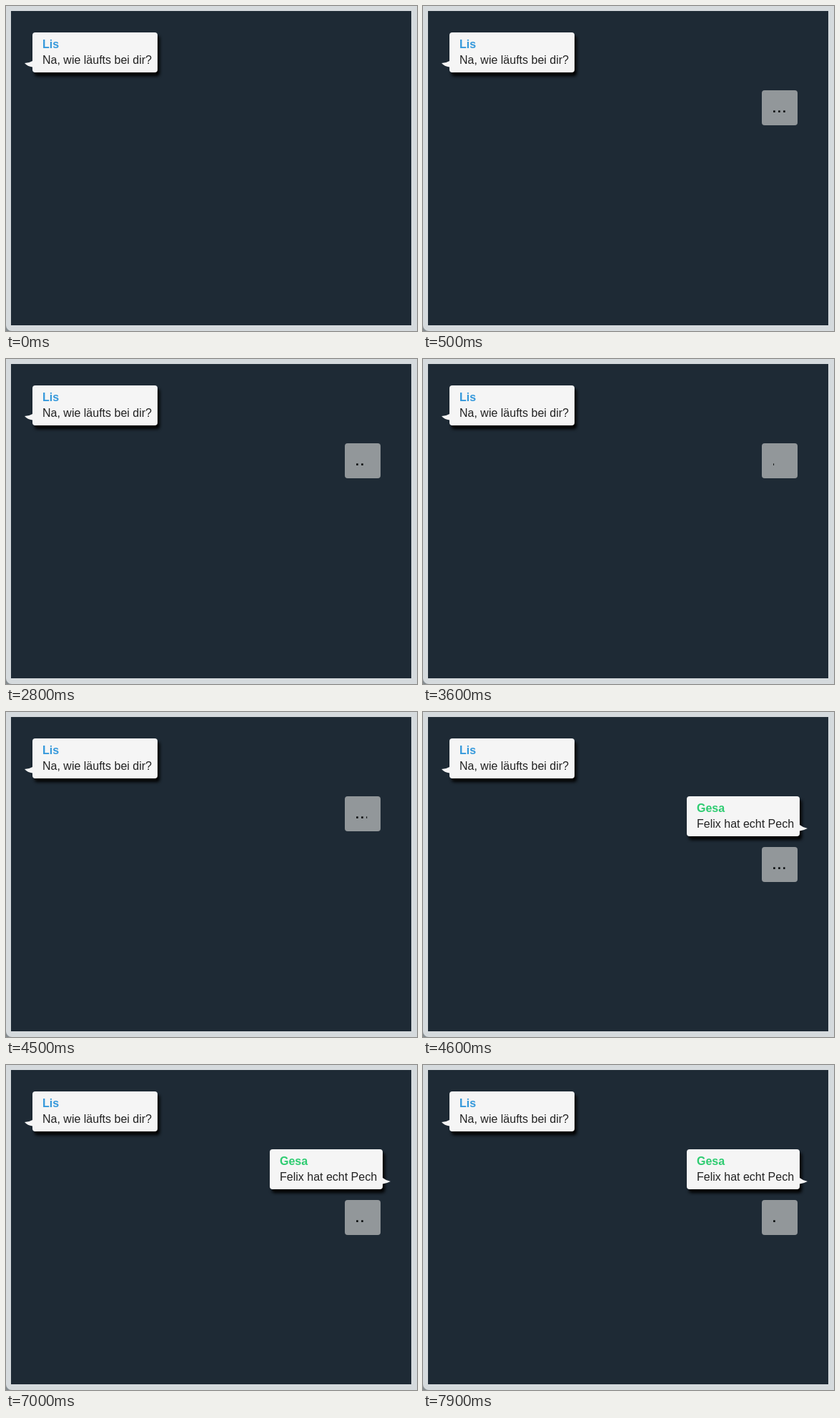
An HTML page that plays this animation: 575x455 px, repeating every 8000 ms.

```html
<!DOCTYPE html>
<html lang="de">
<head>
<meta charset="utf-8">
<title>Chat</title>
<style>
  html, body { margin: 0; width: 100%; height: 100%; overflow: hidden; background: #858c90; }
  #stage { position: relative; width: 575px; height: 455px; overflow: hidden; box-sizing: border-box;
    background: #d5dadd; border-bottom-left-radius: 8px; font: 16px/22px "Liberation Sans", Arial, sans-serif; }
  #screen { position: absolute; left: 7px; top: 7px; width: 560px; height: 440px; background: #1e2a35; }
  .bubble { position: absolute; height: 56px; box-sizing: border-box; padding: 6px 0 0 14px;
    border-radius: 4px; background: #f5f5f5; color: #222; white-space: nowrap; box-shadow: 3px 5px 4px #000; }
  .bubble b { display: block; }
  .bubble svg { position: absolute; top: 39px; width: 11px; height: 11px; fill: #f5f5f5; }
  #question { left: 37px; top: 37px; width: 175px; }
  #question b { color: #3498db; }
  #question svg { left: -11px; }
  #answer { left: 369px; top: 118px; width: 158px; }
  #answer b { color: #2ecc71; }
  #answer svg { right: -11px; }
  #typing { position: absolute; left: 474px; width: 50px; height: 49px; border-radius: 4px; background: #92979a; }
  #typing svg { position: absolute; left: 0; top: 0; }
</style>
</head>
<body>
<div id="stage">
  <div id="screen"></div>
  <div class="bubble" id="question"><b>Lis</b>Na, wie läufts bei dir?
    <svg><path d="M0 4Q6 4 11 1V9.5Q4 8.5 0 4"/></svg></div>
  <div class="bubble" id="answer"><b>Gesa</b>Felix hat echt Pech
    <svg><path d="M11 6Q5 5 0 1V9.5Q6 8.5 11 6"/></svg></div>
  <div id="typing"><svg width="50" height="49">
    <clipPath id="reveal"><rect id="window" x="13" width="0" height="49"/></clipPath>
    <g clip-path="url(#reveal)" fill="#060809">
      <rect x="16.1" y="28.3" width="2.6" height="2.6"/>
      <rect x="23.1" y="28.3" width="2.6" height="2.6"/>
      <rect x="30.1" y="28.3" width="2.6" height="2.6"/>
    </g>
  </svg></div>
</div>
<script>
  const LOOP = 8000, TICK = 100;
  const TYPING_START = 500, ANSWER_START = 4600;
  const DOTS_PERIOD = 1375, DOTS_RESET = 590, DOTS_WIDTH = 21.5;
  const byId = id => document.getElementById(id);
  const answer = byId("answer"), typing = byId("typing"), revealWindow = byId("window");
  const show = (element, visible) => element.style.display = visible ? "block" : "none";

  function draw(time) {
    const t = Math.floor(time % LOOP / TICK) * TICK;
    const answered = t >= ANSWER_START;
    show(answer, answered);
    show(typing, t >= TYPING_START);
    typing.style.top = (answered ? 189 : 118) + "px";
    // The dots are uncovered from left to right, then hidden at once.
    const phase = (t - DOTS_RESET + DOTS_PERIOD) % DOTS_PERIOD / DOTS_PERIOD;
    revealWindow.setAttribute("width", phase * DOTS_WIDTH);
  }

  const start = performance.now();
  function frame() {
    draw(performance.now() - start);
    requestAnimationFrame(frame);
  }
  frame();
</script>
</body>
</html>
```
